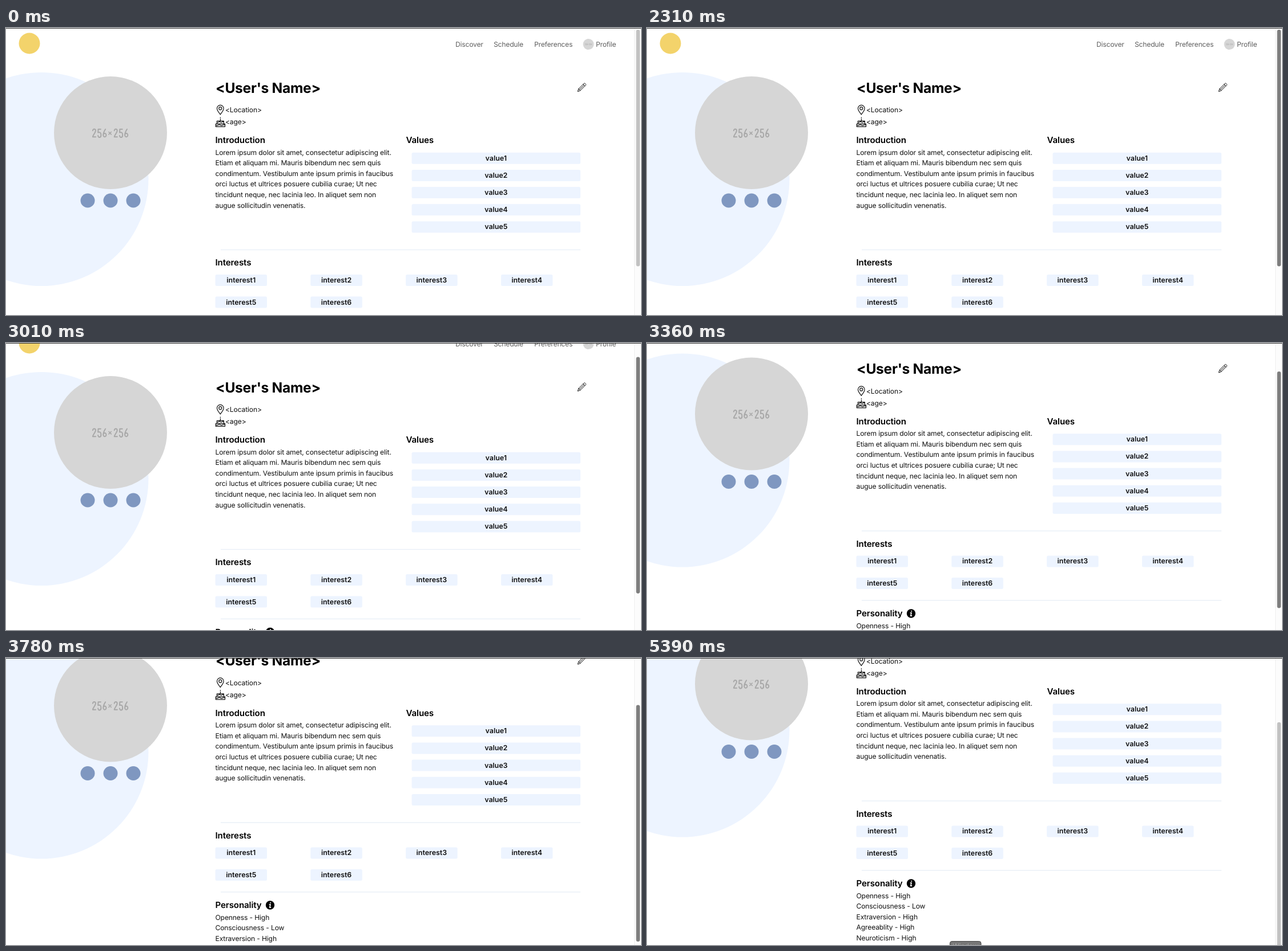
These frames come from a looping animation (1112 px wide and 504 px high, 5.46 s). An HTML page:

```html
<!DOCTYPE html>
<html lang="en">
<head>
<meta charset="utf-8">
<title>Profile page</title>
<style>
  html, body { margin: 0; width: 100%; height: 100%; overflow: hidden; background: #fff; }
  svg { display: block; width: 1112px; height: 504px; }
  text {
    font: 400 12.1px Inter, "Noto Sans", sans-serif;
    letter-spacing: -.011em;
    fill: #111;
    white-space: pre;
    text-rendering: geometricPrecision;
  }
  .title { font-size: 24.6px; font-weight: 650; letter-spacing: -.012em; fill: #000; }
  .head { font-size: 15.1px; font-weight: 620; letter-spacing: -.008em; fill: #000; }
  .tag { font-size: 12.4px; font-weight: 620; letter-spacing: 0; text-anchor: middle; }
  .nav { fill: #5f5f5f; letter-spacing: -.0153em; }
  .pale { fill: #edf4ff; }
  .grey { fill: #d6d6d6; }
  .rule { fill: #e9eff7; }
  .line { fill: none; stroke: #111; stroke-width: 1.2; stroke-linejoin: round; stroke-linecap: round; }
</style>
</head>
<body>
<svg viewBox="0 0 1112 504">
  <defs>
    <g id="size" fill="none" stroke="#a8a8a8" stroke-width="2" stroke-linejoin="round" stroke-linecap="round">
      <g id="digits">
        <path d="M-30.6 -4.2A2.5 2.7 0 0 1 -25.6 -4.2C-25.6 -.8 -30.6 4 -30.6 6.8H-25.4"/>
        <path d="M-16.6 -6.8H-21L-21.3 -1Q-16.2 -2.4 -16.2 2.6A2.6 4 0 0 1 -21.4 4.4"/>
        <path d="M-8.4 -6.8Q-12.2 -1 -12.2 3.8A2.6 3.1 0 1 0 -12 2.4"/>
      </g>
      <use href="#digits" x="37.8"/>
      <path d="M-2.6 -2L1.8 2.4M1.8 -2L-2.6 2.4" stroke-width="1.6"/>
    </g>
  </defs>

  <g id="page">
    <circle cx="41" cy="27" r="18.5" fill="#f3d36b"/>
    <circle class="grey" cx="1020" cy="28.5" r="9.5"/>
    <use href="#size" transform="translate(1020 28.5) scale(.19)"/>

    <circle class="pale" cx="62" cy="265.5" r="187.5"/>
    <circle class="grey" cx="183" cy="184" r="99"/>
    <use href="#size" x="182.5" y="184.5" aria-label="256×256"/>
    <g fill="#7f97c0">
      <circle cx="143" cy="303" r="12.5"/>
      <circle cx="183" cy="303" r="12.5"/>
      <circle cx="223" cy="303" r="12.5"/>
    </g>

    <g class="line">
      <path stroke-width="1" transform="translate(1000.5 96)" d="M.8 15.2L2.2 10.8 11.8 1.2Q12.6 .5 13.4 1.3L14.8 2.7Q15.5 3.5 14.8 4.3L5.2 13.8ZM2.2 10.8L5.2 13.8M10.2 2.8L13.2 5.8M3.7 12.3L11.8 4.3"/>
      <path d="M375.3 152C373 148.5 369.5 145 369.5 141.2a5.8 5.8 0 0 1 11.6 0C381.1 145 377.6 148.5 375.3 152Z"/>
      <circle cx="375.3" cy="141.2" r="2.5"/>
      <path d="M367.3 173.3H383.5V168.3H367.3ZM369.4 168V163.3H381.4V168M375.4 163V159.8M375.4 158V157M369.4 165.2q1.5 1.6 3 0t3 0 3 0 3 0M367.5 170.6q2 1.5 4 0t4 0 4 0 4 0"/>
    </g>

    <rect class="rule" x="376" y="388.8" width="630" height="1.4"/>
    <rect class="rule" x="376" y="510.8" width="630" height="1.4"/>

    <circle cx="462.5" cy="534.5" r="7.7"/>
    <g stroke="#fff" fill="none">
      <path d="M463.2 529.6l-.2 1.6" stroke-width="2.2"/>
      <path d="M460.6 533.2H463L461.8 538.6H464.2" stroke-width="1.6"/>
    </g>
  </g>

  <rect x="1100" width="12" height="504" fill="#fcfcfc"/>
  <rect x="1100" width="1" height="504" fill="#eee"/>
  <rect id="thumb" x="1103.5" y="3" width="6.6" height="415.5" rx="3.3"/>
  <rect width="1112" height="1" fill="#3a3a3a"/>

  <g id="tip">
    <rect x="530.5" y="497.5" width="54.5" height="20" rx="3.5" fill="#777" stroke="#444"/>
    <text x="557.7" y="510" text-anchor="middle" style="fill:#a5a5a5">Window</text>
  </g>
</svg>
<script>
const LOOP = 5460, STEP = 70;
const $ = id => document.getElementById(id);
const page = $('page'), thumb = $('thumb'), tip = $('tip');

function add(name, attrs, text = '') {
  const el = document.createElementNS('http://www.w3.org/2000/svg', name);
  for (const key in attrs) el.setAttribute(key, attrs[key]);
  el.textContent = text;
  page.append(el);
}
const write = (x, y, text, cls = '') => add('text', { x, y, class: cls }, text);
const lines = (y, list) => list.forEach((s, i) => write(366.5, y + i * 18.6, s));

function tag(x, y, width, text) {
  add('rect', { x, y, width, height: 20, rx: 2.5, class: 'pale' });
  write(x + width / 2, y + 14, text, 'tag');
}

write(787, 33.2, 'Discover', 'nav');
write(854, 33.2, 'Schedule', 'nav');
write(925, 33.2, 'Preferences', 'nav');
write(1033, 33.2, 'Profile', 'nav');

write(367, 113.5, "<User's Name>", 'title');
write(384, 148.3, '<Location>');
write(384, 169.3, '<age>');

write(366.5, 202.4, 'Introduction', 'head');
lines(222.6, [
  'Lorem ipsum dolor sit amet, consectetur adipiscing elit.',
  'Etiam et aliquam mi. Mauris bibendum nec sem quis',
  'condimentum. Vestibulum ante ipsum primis in faucibus',
  'orci luctus et ultrices posuere cubilia curae; Ut nec',
  'tincidunt neque, nec lacinia leo. In aliquet sem non',
  'augue sollicitudin venenatis.'
]);

write(700.5, 202.4, 'Values', 'head');
for (let i = 0; i < 5; i++) tag(710.5, 218.8 + i * 30.15, 295.5, 'value' + (i + 1));

write(366.5, 417.2, 'Interests', 'head');
for (let i = 0; i < 6; i++)
  tag(366.5 + (i % 4) * 166.8, 432.9 + (i >> 2) * 38.7, 90.5, 'interest' + (i + 1));

write(366.5, 539.8, 'Personality', 'head');
lines(560, [
  'Openness - High',
  'Consciousness - Low',
  'Extraversion - High',
  'Agreeablity - High',
  'Neuroticism - High'
]);

// [time, scroll offset]
const track = [
  [0, 0], [2450, 0], [2660, 4], [2800, 11], [3010, 27], [3360, 59.5],
  [3780, 100.5], [4060, 128], [4200, 137.6], [4340, 138.5], [LOOP, 138.5]
];

function scrollAt(t) {
  const i = track.findIndex(k => k[0] > t);
  const [t0, y0] = track[i - 1], [t1, y1] = track[i];
  return y0 + (y1 - y0) * (t - t0) / (t1 - t0);
}

const start = performance.now();
function draw() {
  const elapsed = Math.max(0, performance.now() - start) % LOOP;
  const t = Math.floor(elapsed / STEP) * STEP;
  const y = scrollAt(t);
  page.setAttribute('transform', `translate(0 ${-y})`);
  thumb.setAttribute('y', 3 + y * 0.792);
  thumb.setAttribute('fill', t >= 2100 && t < 4760 ? '#7e7e7e' : '#c2c2c2');
  tip.setAttribute('visibility', t >= 5390 ? 'visible' : 'hidden');
  requestAnimationFrame(draw);
}
draw();
</script>
</body>
</html>
```
